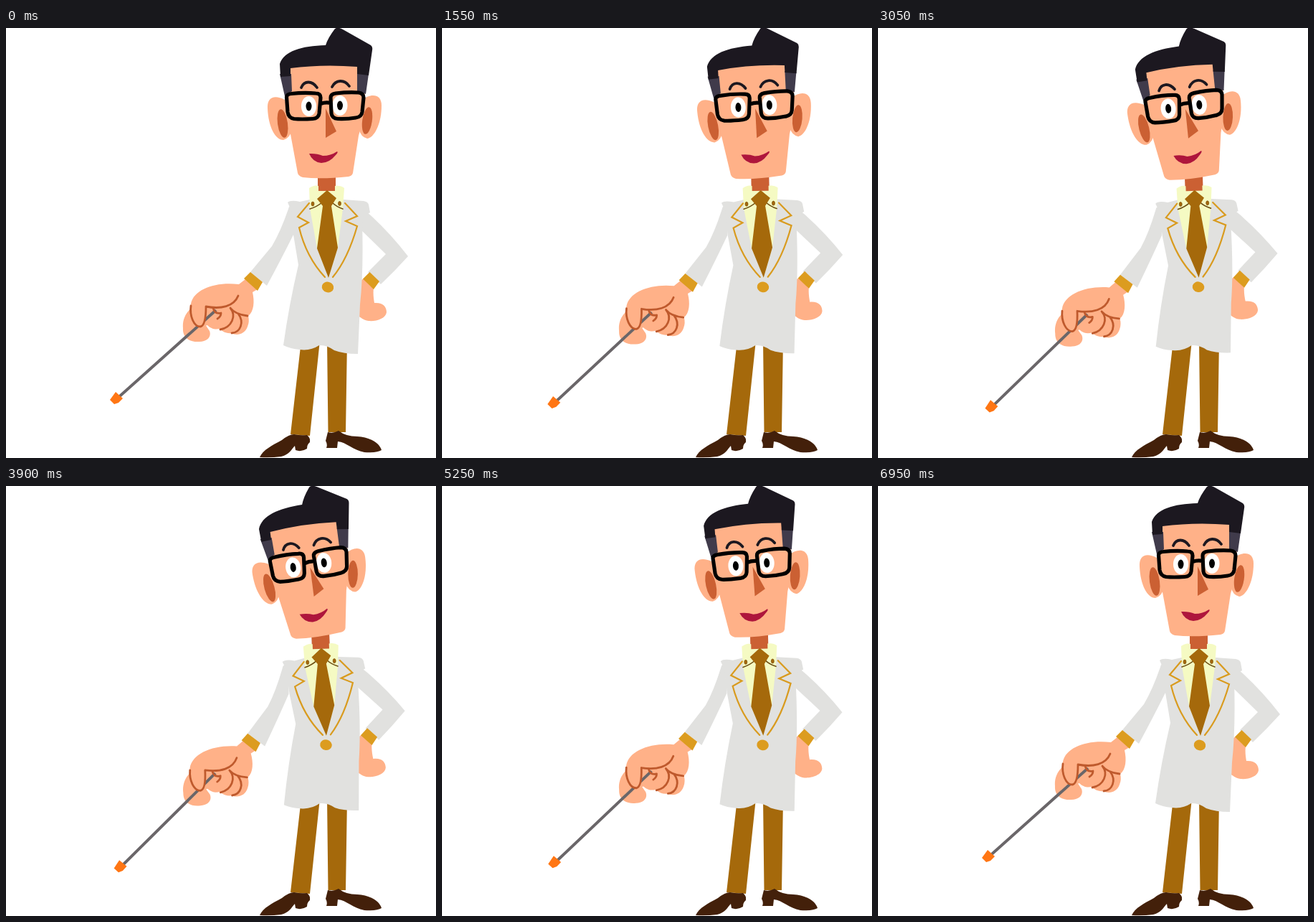
An HTML page for the animation above (7000 ms loop, 600x599 px).

```html
<!DOCTYPE html>
<html lang="en">
<head>
<meta charset="utf-8">
<title>Presenter</title>
<style>
  html, body { margin: 0; width: 100%; height: 100%; overflow: hidden; background: #fff; }
  svg { display: block; width: 600px; height: 599px; }
  .coat { fill: #e1e1df; }
  .skin { fill: #ffb188; }
  .shade { fill: #cb6033; }
  .brown { fill: #a5690b; }
  .gold { fill: #dc9c1f; }
  .shirt { fill: #f5fac3; }
  .hair { fill: #1c1820; }
  .temple { fill: #403b4b; }
  .shoe { fill: #43200a; }
  .line { fill: none; stroke-linecap: round; stroke-linejoin: round; }
  .trim { stroke: #d99b1e; stroke-width: 2.2; stroke-linejoin: miter; }
  .crease { stroke: #bf5a2d; stroke-width: 2.8; }
  .fold { stroke: #6b4d12; stroke-width: 1.6; }
  .brow { stroke: #1c1820; stroke-width: 3.8; }
  .frame { stroke: #000; stroke-width: 5.2; }
</style>
</head>
<body>
<svg viewBox="0 0 600 599">
  <g id="legs">
    <path class="brown" d="M412 435 L438 435 L424 568 L397 566Z M448 435 L476 435 L474 563 L449.500 563Z"/>
    <path class="shoe" d="M354 598 C358 588 372 581 385 574 Q395 566 402 566 Q411 568 420 567 Q425 571 424 577 Q420 580 420 586 Q412 591 404 588 L403 582 C398 587 396 594 384 597 Q369 599 354 598Z"/>
    <path class="shoe" d="M449 563 Q457 565 464 561 Q474 569 490 569 C508 570 521 578 524 588 Q518 592 500 591 C484 588 475 577 463 576 L462 585 L447 585 Q449 580 446 575Z"/>
  </g>

  <g id="body">
    <g id="restingArm">
      <path class="skin" d="M499 349 L513 362 C512 370 513 377 514 383 C526 382 531 388 531 396 C530 405 516 409 506 408 C498 407 495 403 490 400 L490 355Z"/>
      <path class="coat" d="M496 250 L510 262 Q538 288 561 318 Q543 338 523 357 L505 340 L530 315 L494 280Z"/>
      <path class="gold" d="M507.500 340 L521 353 L513 364 L498 349.500Z"/>
    </g>

    <g id="pointingArm">
      <path class="skin" d="M258 391 C250 397 246 408 247 418 C246 432 257 438 270 437 C281 437 287 430 284 422 L276 410Z"/>
      <path class="skin" d="M334 350 L325 357 C292 353 262 364 258 384 C255 400 261 415 271 417 L281 414 C287 420 293 420 298 419 C303 424 310 426 314 425 C322 429 333 427 337 416 Q340 409 338 401 C346 395 347 381 344 368 L351 364Z"/>
      <path d="M293 393 L158 513.500" fill="none" stroke="#6a6669" stroke-width="4"/>
      <path fill="#ff7614" d="M153 507 L163 516 L157 522 L151 524 L145 518Z"/>
      <path class="skin" d="M258 386 C256 400 261 415 271 416 C279 415 277 399 280 389 L270 380Z"/>
      <path class="line crease" d="M324 373 C318 388 300 392 279 388 C279 399 278 415 271 416 C262 416 256 401 258 387"/>
      <path class="line crease" d="M289 390 Q291 399 300 397 Q300 402 295 405 M313 390 C322 401 315 417 299 420 M313 390 Q320 399 337 401 M324 398 C333 410 327 424 315 425"/>
      <path class="coat" d="M404 242 L395 249 Q384 282 371 304 L341 340 L364 359 Q384 322 401 288Z"/>
      <path class="gold" d="M341 340 L358 354 L351 366 L332 349Z"/>
    </g>

    <path class="shade" d="M435 200 H460 V230 H435Z"/>
    <path class="coat" d="M393 243 Q397 239 410 242 L424 239 H471 L499 241 Q505 242 506 246 L508 257 L499 262 L497 270 Q499 340 494 385 L491 454 Q471 454 458 449 Q447 441 437 442 Q425 450 410 448 Q397 447 387 442 Q395 385 408 330 L401 288 L398 254Z"/>
    <path class="shirt" d="M423 223 Q430 218 436 220 L436 227 H459 V220 Q467 219 472 223 L470 252 L463 306 L450 348 L434 307 L424 251Z"/>
    <path class="line fold" d="M424 252 Q434 249 441 243 M470 252 Q461 249 455 243"/>
    <g class="brown" stroke="#7a5010" stroke-width=".7">
      <ellipse cx="428" cy="245" rx="2" ry="3"/>
      <ellipse cx="465.500" cy="244.500" rx="2" ry="3"/>
    </g>
    <path class="brown" d="M448 226 L461 237 L454 248 L463 306 L450 348 L434 307 L442 248 L434 238Z"/>
    <path class="line trim" d="M423 244 L407 263 L422 271 L409 278 C416 307 430 331 445 347 M473 244 L490 262 L474 269 L490 276 C482 304 470 330 456 347"/>
    <ellipse class="gold" cx="449" cy="361" rx="8.300" ry="7.300" transform="rotate(15 449 361)"/>

    <g id="head">
      <path class="skin" d="M389 100 C374 92 364 97 365 112 C366 138 376 156 387 156 Q396 154 400 140Z"/>
      <path class="skin" d="M498 99 C510 91 524 92 524 108 C524 135 513 153 504 154 Q495 152 492 140Z"/>
      <path class="skin" d="M394 50 H493 L501 90 L498 128 L492 150 L484 202 Q483 206 478 207 Q440 211 414 208 Q408 206 407 202 L397 148 L390 125 L390 92Z"/>
      <ellipse class="shade" cx="386" cy="133" rx="7" ry="20" transform="rotate(-8 386 133)"/>
      <ellipse class="shade" cx="504" cy="129" rx="6.800" ry="19" transform="rotate(8 504 129)"/>
      <path class="temple" d="M382 64 H398 L399 88 L389 95Z M490 62 L506 64 L502 92 L490 88Z"/>
      <path class="hair" d="M383 68 L382 50 C388 32 412 25 446 24 Q449 14 459 1 Q463 -2 470 2 L509 24 Q512 26 511 31 L506 66 L490 64 V54 Q442 50 397 56 V67Z"/>
      <path class="line brow" d="M412 83 C416 73 427 73 434 83 M455 82 C460 72 472 71 479 81"/>
      <g fill="#fff">
        <ellipse cx="422.500" cy="109" rx="10.500" ry="14"/>
        <ellipse cx="466" cy="108" rx="10.500" ry="14"/>
      </g>
      <ellipse cx="422.500" cy="109" rx="4" ry="6.500"/>
      <ellipse cx="466" cy="108" rx="4" ry="6.500"/>
      <path class="shade" d="M446 112 L461 144 L446 153Z"/>
      <path class="line frame" d="M391.500 96 Q392 92 398 91.500 Q416 89.500 432 91 Q439 91 439 97 L437 119 Q436 126 428 126.500 Q412 127.500 402 126.500 Q394 125 393 117Z M453 97 Q453 92 460 91 Q478 89 492 90 Q499 91 499 97 L497 117 Q496 124 488 125 Q476 127 463 126.500 Q455 126 454 119Z M439 105.500 Q446 103 453 104.500"/>
      <path fill="#ae163c" d="M423 175 Q434 174.500 442 178 Q453 178 462 172 Q464 173 460 177 Q451 188 440 188 Q428 187 423 175Z"/>
    </g>
  </g>
</svg>
<script>
  const LOOP = 7000;
  // Sway amount over time: [ms, 0..1]
  const SWAY = [[0, 0], [2250, 0.6], [3900, 1], [5250, 0.575], [6950, 0], [LOOP, 0]];
  // Each joint: element, full-sway angle, pivot
  const JOINTS = [
    ["body", -2.35, 440, 422],
    ["head", -5, 453, 215],
    ["pointingArm", -0.6, 400, 390],
  ].map(([id, angle, x, y]) => ({ el: document.getElementById(id), angle, x, y }));

  function swayAt(ms) {
    const i = SWAY.findIndex(([time]) => time > ms);
    const [t0, a] = SWAY[i - 1];
    const [t1, b] = SWAY[i];
    return a + (b - a) * (ms - t0) / (t1 - t0);
  }

  function draw(now) {
    const sway = swayAt(now % LOOP);
    for (const { el, angle, x, y } of JOINTS) {
      el.setAttribute("transform", `rotate(${angle * sway} ${x} ${y})`);
    }
  }

  let start;
  function tick(now) {
    start ??= now;
    draw(now - start);
    requestAnimationFrame(tick);
  }
  draw(0);
  requestAnimationFrame(tick);
</script>
</body>
</html>
```
